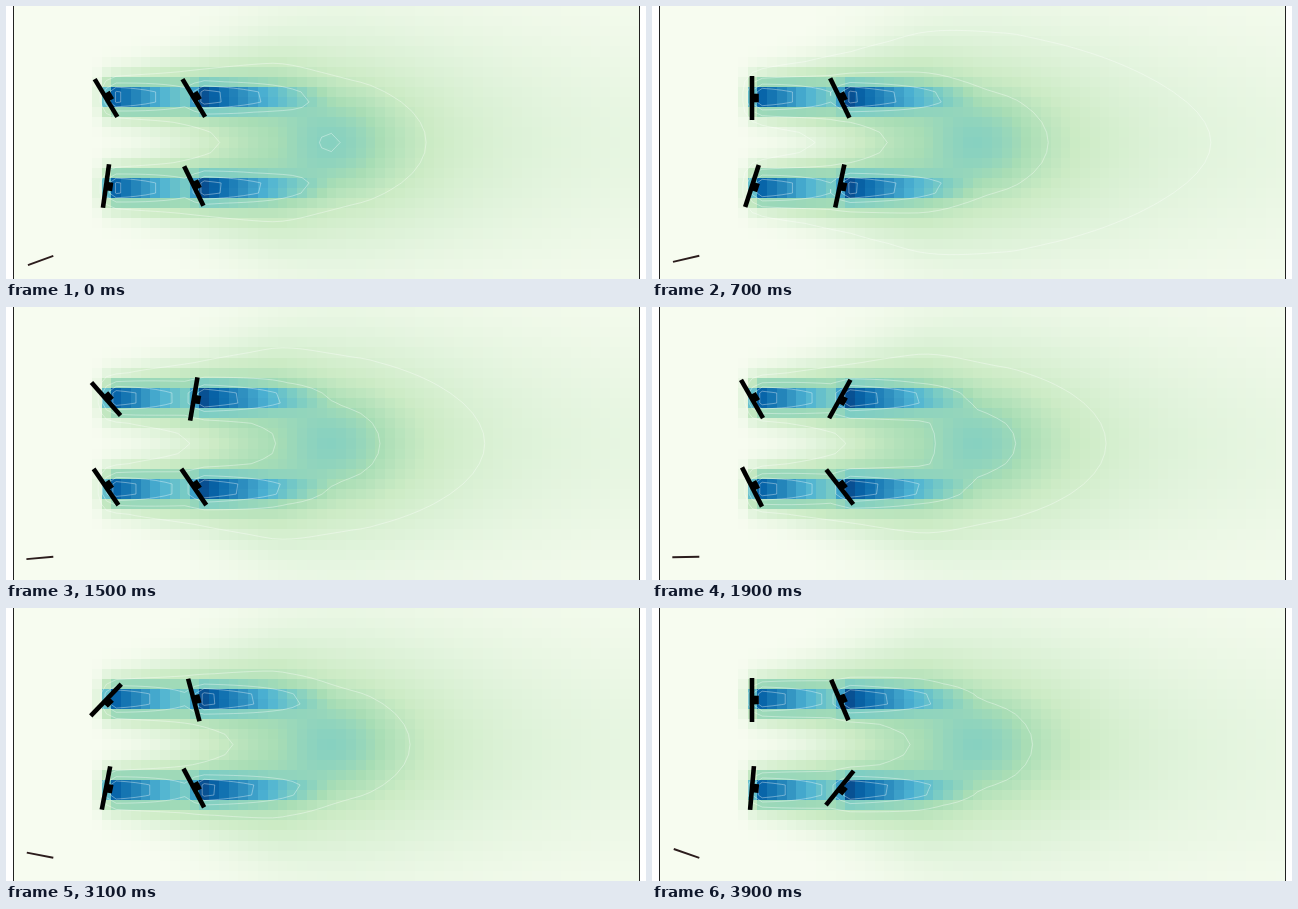
An HTML page with a canvas for the animation above (4000 ms loop, 640 by 273 pixels).

```html
<!DOCTYPE html>
<html lang="en">
<head>
<meta charset="utf-8">
<title>Wind farm wakes</title>
<style>
  html, body { margin: 0; width: 100%; height: 100%; overflow: hidden; background: #fff; }
  canvas { display: block; }
</style>
</head>
<body>
<canvas id="stage" width="640" height="273"></canvas>
<script>
const ctx = document.getElementById('stage').getContext('2d');
const LOOP = 4000, STEP = 100;
const COLS = 64, ROWS = 27, LEFT = 7.5, RIGHT = 633.5, HEIGHT = 273;
const cellW = (RIGHT - LEFT) / COLS, cellH = HEIGHT / ROWS;

// Pale green to deep blue colour ramp.
const RAMP = ['f7fcf0', 'e0f3db', 'ccebc5', 'a8ddb5', '7bccc4', '4eb3d3', '2b8cbe', '0868ac', '084081']
  .map(hex => [0, 2, 4].map(i => parseInt(hex.slice(i, i + 2), 16)));

// Yaw poses in degrees, reached at the matching time in seconds.
const POSE_TIMES = [0, .7, 1.2, 1.9, 2.4, 3.1, 3.9];
const TURBINES = [
  { x: 100, y: 92, yaw: [-31, 0, -50, -30, 24, 44, 0] },
  { x: 187.8, y: 92, yaw: [-31, -26, -5, 29, 20, -15, -23] },
  { x: 100, y: 180, yaw: [8, 18, -40, -27, 36, 11, 5] },
  { x: 187.8, y: 180, yaw: [-26, 12, -32, -38, 22, -28, 39] }
];

const rad = deg => deg * Math.PI / 180;
const mix = (a, b, k) => a + (b - a) * k;
const clamp = v => Math.min(1, Math.max(0, v));
const gauss = (d, spread) => Math.exp(-d * d / (2 * spread * spread));
const smooth = (from, to, v) => {
  const k = clamp((v - from) / (to - from));
  return k * k * (3 - 2 * k);
};

// Extra slowdown right behind a rotor, fading over a given number of columns.
function nearWake(col, start, peak, length) {
  if (col < start - 1) return 0;
  if (col < start) return .4 * peak;
  return peak * clamp(1 - (col - start) / length) ** 1.3;
}

// Two spreading wakes bend together inside one broad far wake.
function deficit(col, row) {
  const fromAxis = Math.abs(row - ROWS / 2);
  const far = .23 * smooth(14, 34, col) * Math.exp(-Math.max(0, col - 36) / 27);
  const amp = .52 * smooth(7.8, 10.2, col) * gauss(col - 10, 14.1);
  const spread = 1.5 + .11 * Math.max(0, col - 10);
  const offset = 4.5 * (1 - smooth(26, 40, col));
  const fromRotor = Math.abs(fromAxis - 4.5);
  const share = fromRotor < 1 ? 1 : fromRotor < 2 ? .2 : 0;
  const near = nearWake(col, 10, .42, 9.5) + nearWake(col, 19, .53, 14);
  return far * gauss(fromAxis, 8.5)
    + amp * (gauss(fromAxis - offset, spread) + gauss(fromAxis + offset, spread))
    + share * near;
}

const field = Array.from({ length: ROWS }, (_, r) =>
  Array.from({ length: COLS }, (_, c) => deficit(c + .5, r + .5)));

function rampColor(v) {
  const p = Math.min(.9999, clamp(v)) * (RAMP.length - 1);
  const i = Math.floor(p);
  return `rgb(${RAMP[i].map((a, j) => Math.round(mix(a, RAMP[i + 1][j], p - i)))})`;
}

const backdrop = document.createElement('canvas');
backdrop.width = 640;
backdrop.height = HEIGHT;
const paint = backdrop.getContext('2d');
paint.fillStyle = '#fff';
paint.fillRect(0, 0, 640, HEIGHT);
field.forEach((line, r) => line.forEach((v, c) => {
  const x = Math.round(LEFT + c * cellW), y = Math.round(r * cellH);
  paint.fillStyle = rampColor(v);
  paint.fillRect(x, y, Math.round(LEFT + (c + 1) * cellW) - x, Math.round((r + 1) * cellH) - y);
}));

// Marching squares through the cell centres.
function contour(level) {
  const corners = [[0, 0], [1, 0], [1, 1], [0, 1]];
  ctx.beginPath();
  for (let r = 0; r < ROWS - 1; r++) {
    for (let c = 0; c < COLS - 1; c++) {
      const hits = [];
      corners.forEach(([ax, ay], i) => {
        const [bx, by] = corners[(i + 1) % 4];
        const a = field[r + ay][c + ax], b = field[r + by][c + bx];
        if ((a < level) === (b < level)) return;
        const k = (level - a) / (b - a);
        hits.push([LEFT + (c + .5 + mix(ax, bx, k)) * cellW, (r + .5 + mix(ay, by, k)) * cellH]);
      });
      for (let i = 0; i + 1 < hits.length; i += 2) {
        ctx.moveTo(...hits[i]);
        ctx.lineTo(...hits[i + 1]);
      }
    }
  }
  ctx.stroke();
}

function segment(x1, y1, x2, y2, width, color) {
  ctx.strokeStyle = color;
  ctx.lineWidth = width;
  ctx.beginPath();
  ctx.moveTo(x1, y1);
  ctx.lineTo(x2, y2);
  ctx.stroke();
}

function yawAt(yaw, t) {
  const next = Math.max(1, POSE_TIMES.findIndex(time => time >= t));
  const from = POSE_TIMES[next - 1];
  return mix(yaw[next - 1], yaw[next], (t - from) / (POSE_TIMES[next] - from));
}

function drawTurbine({ x, y, yaw }, t) {
  ctx.save();
  ctx.translate(x, y);
  ctx.rotate(rad(yawAt(yaw, t)));
  ctx.fillStyle = '#000';
  ctx.fillRect(-2.3, -22, 4.6, 44);
  ctx.fillRect(0, -4.3, 6.8, 8.6);
  ctx.restore();
}

function draw(t) {
  ctx.drawImage(backdrop, 0, 0);

  ctx.strokeStyle = 'rgba(255,255,255,.36)';
  ctx.lineWidth = 1;
  for (let level = .06 + .0755 * t; level < 1; level += .2) {
    if (level > .08) contour(level);
  }

  segment(LEFT, 0, LEFT, HEIGHT, 1, '#222');
  segment(RIGHT, 0, RIGHT, HEIGHT, 1, '#222');
  TURBINES.forEach(turbine => drawTurbine(turbine, t));

  const wind = rad(-20 + 10 * t);
  segment(47.3 - 27 * Math.cos(wind), 249.8 - 27 * Math.sin(wind), 47.3, 249.8, 1.9, '#2b1c1c');
}

let shown = -1;
function tick() {
  const step = Math.floor(performance.now() % LOOP / STEP);
  if (step !== shown) {
    shown = step;
    draw(step * STEP / 1000);
  }
  requestAnimationFrame(tick);
}
tick();
</script>
</body>
</html>
```
